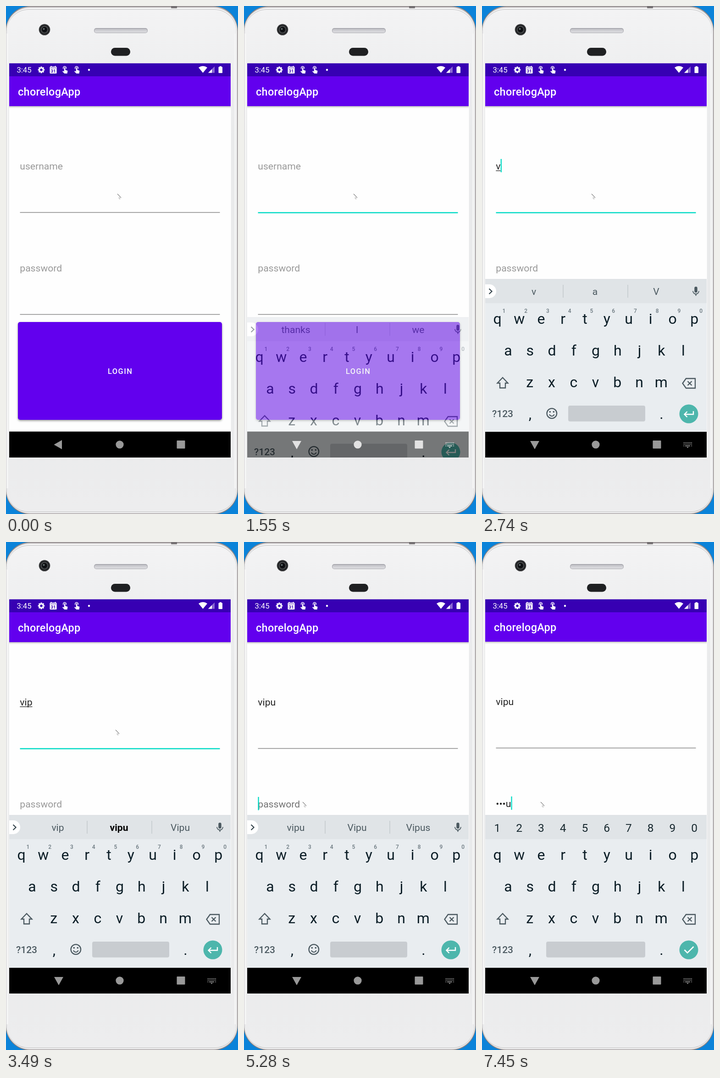
These frames come from a looping animation (506 by 1106 pixels, 8 s). An HTML page with a canvas:

```html
<!DOCTYPE html>
<html lang="en">
<head>
<meta charset="utf-8">
<title>Login on a phone</title>
<style>
  html, body { margin: 0; width: 100%; height: 100%; overflow: hidden; background: #0b83d9; }
  canvas { display: block; width: 506px; height: 1106px; }
</style>
</head>
<body>
<canvas id="stage" width="506" height="1106"></canvas>
<script>
const W = 506, H = 1106, LOOP = 8000;
const NAME = 'vipu', CAP = 'Vipu', TEAL = '#03dac5', INK = '#0b1d26', SLATE = '#4b5960';
const stage = document.getElementById('stage').getContext('2d');
const layer = () => Object.assign(document.createElement('canvas'), { width: W, height: H }).getContext('2d');
const shell = layer(), keys = layer();
let c = shell;

// Each step changes only the listed parts of the state.
const steps = [
  [0, { user: '', pass: '', focus: '', caret: 0, board: 0, lift: 0, down: 0, mouse: [243, 409], words: ['thanks', 'I', 'we'] }],
  [1120, { focus: 'user', caret: 1 }],
  [1400, { down: 1, mouse: [239, 409] }],
  [1550, { caret: 0, board: 0.5 }],
  [1700, { board: 1 }],
  [2160, { caret: 1 }],
  [2740, { user: NAME[0], words: [NAME[0], 'a', CAP[0]] }],
  [3030, { user: NAME.slice(0, 3), words: [NAME.slice(0, 2), 'I', CAP[0]] }],
  [3180, { words: [NAME.slice(0, 3), '*' + NAME, CAP] }],
  [3490, { caret: 0 }],
  [4010, { user: NAME, caret: 1, words: [NAME, CAP, CAP + 's'] }],
  [4440, { caret: 0, mouse: [75, 415] }],
  [4590, { mouse: [0, 500] }],
  [4710, { mouse: [39, 578] }],
  [4860, { caret: 1, mouse: [127, 569] }],
  [5010, { mouse: [127, 567] }],
  [5130, { mouse: [128, 566] }],
  [5280, { focus: 'pass' }],
  [5430, { lift: 1 }],
  [5830, { caret: 0 }],
  [6170, { pass: NAME[0], caret: 1 }],
  [6740, { pass: '••' + NAME[2] }],
  [7300, { caret: 0 }],
  [7450, { pass: '•••' + NAME[3], caret: 1 }]
];
const stateAt = t => Object.assign({}, ...steps.filter(s => s[0] <= t).map(s => s[1]));

function box(x, y, w, h, fill, r = 0) {
  c.fillStyle = fill;
  c.beginPath();
  c.roundRect(x, y, w, h, r);
  c.fill();
}
function disc(x, y, r, fill) {
  c.fillStyle = fill;
  c.beginPath();
  c.arc(x, y, r, 0, 7);
  c.fill();
}
function trace(pts, close) {
  c.beginPath();
  for (let i = 0; i < pts.length; i += 2) c.lineTo(pts[i], pts[i + 1]);
  if (close) c.closePath();
}
function poly(fill, ...pts) {
  trace(pts, true);
  c.fillStyle = fill;
  c.fill();
}
function line(color, width, pts, close) {
  trace(pts, close);
  c.strokeStyle = color;
  c.lineWidth = width;
  c.stroke();
}
function arc(x, y, r, a, b, color, width) {
  c.beginPath();
  c.arc(x, y, r, a, b);
  c.strokeStyle = color;
  c.lineWidth = width;
  c.stroke();
}
function text(str, x, y, size, color, align = 'left', weight = 400, gap = 0) {
  c.font = `${weight} ${size}px Roboto, Arial, sans-serif`;
  c.textAlign = align;
  c.letterSpacing = gap + 'px';
  c.fillStyle = color;
  c.fillText(str, x, y);
  const w = c.measureText(str).width;
  c.letterSpacing = '0px';
  return w;
}
function fade(x0, y0, x1, y1, ...colors) {
  const g = c.createLinearGradient(x0, y0, x1, y1);
  colors.forEach((col, i) => g.addColorStop(i / (colors.length - 1), col));
  return g;
}

function drawShell() {
  c = shell;
  box(0, 0, W, H, '#0b83d9');
  box(-1, 0, 507, 1107, '#857f80', 54);
  box(0, 1.5, 505, 1104, '#c9c5c6', 53);
  box(0.5, 4, 503.5, 1100, '#f6f6f6', 51);
  box(1, 7, 502, 1095, '#b9b9bb', 49);
  box(1.5, 8, 501, 1093, fade(0, 8, 0, 1101, '#f3f3f4', '#e9eaeb', '#e9eaeb', '#e9eaeb', '#ededee'), 48);
  line('#f7f7f7', 3, [3, 60, 3, 1050]);
  line('#f7f7f7', 3, [500, 60, 500, 1050]);
  box(360, 0, 13, 5, '#777375', 1);

  disc(84, 51.5, 12.3, '#3a3b3d');
  disc(84, 51.5, 10.5, '#1c1d1f');
  arc(84, 51.5, 7.5, 0, 7, '#56595b', 1.5);
  disc(84, 51.5, 5, '#0c0e11');
  disc(82.5, 50, 2, '#65706f');
  box(192, 48, 117, 11, '#a9a9af', 5);
  box(193, 50, 115, 8, fade(0, 50, 0, 58, '#c3c3c8', '#dedee2'), 4);
  box(229, 91, 42, 17.5, '#1f2022', 8.5);
  box(490, 124, 1, 859, '#f7f7f7');
  box(6, 124, 1, 859, '#f1f1f1');
}

function touchIcon(x) {
  arc(x - 1, 135, 3.4, 2.6, 6.8, '#fff', 1.5);
  box(x - 2.3, 133.5, 2.6, 9, '#fff', 1.3);
  poly('#fff', x - 1, 138.5, x + 5.5, 141, x + 4.5, 147, x - 1.5, 147, x - 6, 142.5, x - 5, 141.5, x - 2, 142.5);
}

function statusBar() {
  box(7, 124.5, 483, 28.5, '#3700b3');
  text('3:45', 23.5, 145, 16.6, '#fff');
  for (let i = 0; i < 8; i++) {
    const a = i * Math.PI / 4, cx = Math.cos(a), sy = Math.sin(a);
    line('#fff', 3.2, [77 + cx * 4, 139 + sy * 4, 77 + cx * 7.3, 139 + sy * 7.3]);
  }
  arc(77, 139, 4.2, 0, 7, '#fff', 3);
  box(95.5, 132, 15, 15, '#fff', 1.5);
  box(97.5, 130.5, 2, 3, '#fff');
  box(106.5, 130.5, 2, 3, '#fff');
  box(97, 134.3, 12, 1, '#3700b3');
  text('31', 103, 145, 9.5, '#3700b3', 'center', 700);
  touchIcon(129);
  touchIcon(155);
  disc(181, 139, 2.2, '#fff');
  c.beginPath();
  c.moveTo(429.5, 145.5);
  c.lineTo(420, 134);
  c.quadraticCurveTo(429.5, 127.5, 439, 134);
  c.fillStyle = '#fff';
  c.fill();
  poly('#8a68d2', 455, 131.5, 455, 145.5, 441, 145.5);
  poly('#fff', 449, 137.5, 449, 145.5, 441, 145.5);
  box(463.5, 132.5, 8.5, 13.5, '#fff', 1);
  box(465.8, 131, 4, 2, '#fff');
}

function field(s, id, hint, base) {
  const active = s.focus === id, value = s[id], lineY = base + 93.5;
  if (active) box(30.5, lineY - 0.7, 436, 2.4, TEAL);
  else box(30.5, lineY - 0.7, 436, 1.4, '#868686');
  let w = 0;
  if (value) {
    w = text(value, 30.3, base, 21.1, '#212121');
    if (active && id === 'user') box(30.3, base + 2, w, 1.3, '#212121');
  } else {
    const dark = active && id === 'pass' && !s.lift;
    text(hint, 30.3, base, 21.1, dark ? '#727272' : '#999');
  }
  if (active && s.caret) box(30.4 + w, base - 23, 2.3, 29, TEAL);
}

function content(s) {
  box(7, 152, 483, 775, '#fefefe');
  c.save();
  c.translate(0, -s.lift);
  box(7, 218, 483, 5, fade(0, 218, 0, 223, '#bdbdbd', '#e6e6e6', '#fefefe'));
  box(7, 153, 483, 65, '#6200ee');
  text('chorelogApp', 26, 194.5, 23.45, '#fff', 'left', 500, 0.3);
  field(s, 'user', 'username', 356);
  field(s, 'pass', 'password', 578);
  c.save();
  c.shadowColor = 'rgba(0,0,0,.4)';
  c.shadowBlur = 4;
  c.shadowOffsetY = 2;
  box(26, 688, 445, 213, '#6200ee', 4.7);
  c.restore();
  text('LOGIN', 249.2, 801, 16.4, '#fff', 'center', 500, 1.46);
  c.restore();
}

function navIcons(s, col) {
  if (s.down) {
    poly(col, 105, 947, 125, 947, 115, 965);
    for (let y = 0; y < 2; y++)
      for (let x = 0; x < 7; x++) box(439.5 + x * 2.8, 950 + y * 3.4, 1.7, 1.7, col);
    box(439.5, 956.8, 1.7, 1.7, col);
    box(443, 956.8, 11, 1.7, col);
    box(456.3, 956.8, 1.7, 1.7, col);
    poly(col, 446, 960, 451, 960, 448.5, 962.5);
  } else poly(col, 104.5, 955, 122, 945, 122, 965);
  disc(248, 954.8, 8.6, col);
  box(372.5, 946, 18, 17.5, col, 1);
}

function keyRow(str, x, base) {
  [...str].forEach((k, i) => text(k, x + i * 47.75, base, 32, INK, 'center'));
}

function suggestions(words) {
  c.save();
  c.beginPath();
  c.rect(7, 595, 483, 52);
  c.clip();
  box(-8, 606, 39, 30, '#fff', 15);
  c.restore();
  line('#33434b', 2.2, [15.5, 615.5, 21.5, 621.3, 15.5, 627]);
  words.forEach((word, i) => {
    const bold = word[0] === '*';
    text(bold ? word.slice(1) : word, 113 + i * 133.5, 629, 21.1, bold ? '#000' : SLATE, 'center', bold ? 700 : 400);
  });
  box(176.5, 607, 1, 28, '#b4bbc0');
  box(317.5, 607, 1, 28, '#b4bbc0');
  box(463.3, 611, 6.4, 13, SLATE, 3.2);
  arc(466.5, 620.5, 6.5, 0, Math.PI, SLATE, 1.8);
  line(SLATE, 2, [466.5, 627, 466.5, 631]);
}

function keyboard(s) {
  const secret = s.lift;
  box(7, 595, 483, 388, '#e9edf0');
  box(7, 595, 483, 52, '#e0e4e7');
  box(7, 594.5, 483, 1, '#d6dade');
  if (!secret) suggestions(s.words);
  [...'1234567890'].forEach((d, i) => {
    const x = 33.3 + i * 47.75;
    if (secret) text(d, x, 631, 24.5, '#17282f', 'center');
    else text(d, x + 14.5, 668, 12, '#6c7980', 'center', 500);
  });
  keyRow('qwertyuiop', 33.5, 692);
  keyRow('asdfghjkl', 57, 761);
  keyRow('zxcvbnm', 104.3, 830);

  line(SLATE, 2.3, [45, 809, 33.5, 821, 39, 821, 39, 831.5, 51, 831.5, 51, 821, 56.5, 821], true);
  line(SLATE, 2.3, [437.5, 821.5, 445, 811, 465, 811, 465, 832, 445, 832], true);
  line(SLATE, 2.3, [448.5, 817, 457.5, 826]);
  line(SLATE, 2.3, [457.5, 817, 448.5, 826]);

  text('?123', 45, 895, 21, SLATE, 'center', 500);
  text(',', 105, 899, 32, INK, 'center');
  text('.', 391.5, 899, 32, INK, 'center');
  if (!secret) {
    arc(152.3, 887, 10.8, 0, 7, SLATE, 2.3);
    disc(148.3, 883.6, 1.8, SLATE);
    disc(156.3, 883.6, 1.8, SLATE);
    arc(152.3, 887.3, 5.6, 0.35, 2.8, SLATE, 2.2);
  }
  const left = secret ? 140 : 188;
  box(left, 870, 356 - left, 34.5, '#c8ccd0', 4);
  disc(451, 888, 20.5, '#4db6ac');
  if (secret) line('#fff', 2.5, [441.5, 888, 448, 894.5, 461.5, 881]);
  else {
    line('#fff', 2.4, [461, 882, 461, 889, 442, 889]);
    line('#fff', 2.4, [447.5, 883, 441.5, 889, 447.5, 895]);
  }
}

function pointer([x, y]) {
  line('#3c3c3c', 1, [x, y, x + 8, y + 8.5]);
  line('#a5a5a5', 1, [x + 2.5, y + 9.5, x + 4, y + 7.5, x + 6.5, y + 9.5]);
  line('#8d8d8d', 1, [x + 4, y + 9.5, x + 5.5, y + 12]);
}

function render(t) {
  const s = stateAt(t);
  c = keys;
  c.clearRect(0, 0, W, H);
  if (s.board) keyboard(s);

  c = stage;
  c.drawImage(shell.canvas, 0, 0);
  c.save();
  c.beginPath();
  c.rect(7, 124.5, 483, 858.5);
  c.clip();
  content(s);
  statusBar();
  box(7, 926.5, 483, 57, '#000');
  const sliding = s.board > 0 && s.board < 1;
  if (s.board) {
    c.globalAlpha = s.board;
    const bottom = sliding ? 983 - 83 : 926.5;
    c.drawImage(keys.canvas, 0, 594, W, bottom - 594, 0, sliding ? 677 : 594, W, bottom - 594);
    c.globalAlpha = 1;
  }
  navIcons(s, sliding ? '#e2e2e2' : '#999');
  c.restore();
  pointer(s.mouse);
}

drawShell();
const start = performance.now();
function tick() {
  render((performance.now() - start) % LOOP);
  requestAnimationFrame(tick);
}
tick();
</script>
</body>
</html>
```
